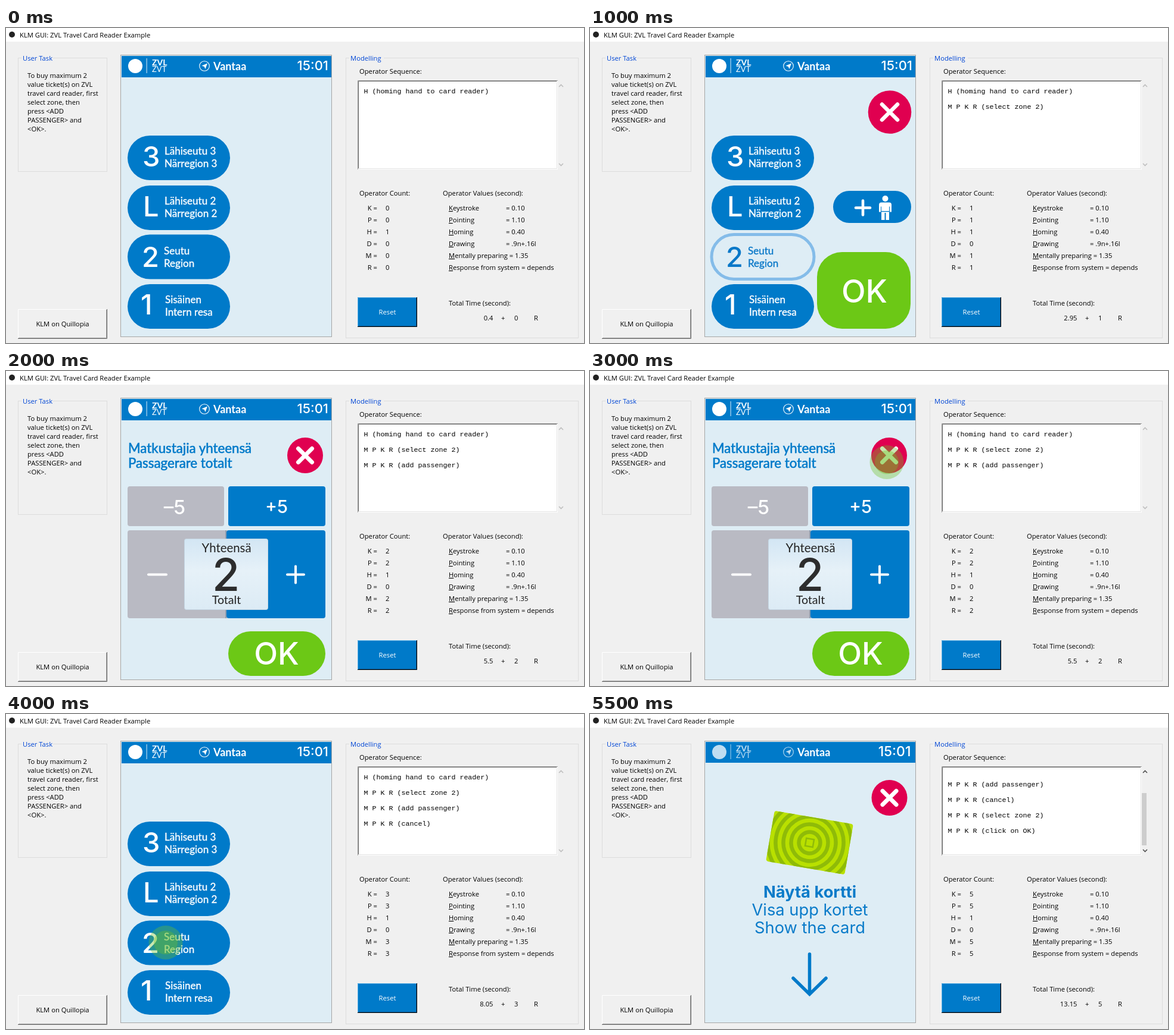
Recreate the animation shown at these times as an HTML page. Size 970x530 px, loop 6.5 s.

```html
<!DOCTYPE html>
<html lang="en">
<head>
<meta charset="utf-8">
<title>KLM GUI</title>
<style>
html, body { margin: 0; width: 100%; height: 100%; overflow: hidden; background: #f0f0f0; }
svg { display: block; }
text { white-space: pre; }
.ui { font: 11.22px "Open Sans", "Noto Sans", sans-serif; fill: #000; }
.log { font: 11.67px "Liberation Mono", monospace; fill: #000; }
.dev { font-family: Lato, sans-serif; }
.num { font-family: Inter, sans-serif; font-weight: 500; }
.card { font: 27.3px Inter, sans-serif; fill: #0a7bc9; }
.mid { text-anchor: middle; }
.end { text-anchor: end; }
.bold { font-weight: 700; }
.blue { fill: #007ac9; }
.white { fill: #fff; }
.legend { fill: #0046d5; }
.frame { fill: none; stroke: #dcdcdc; }
.line { fill: none; stroke: #fff; stroke-linecap: round; }
.zone text { fill: #fff; }
.zone .dev { stroke: #fff; stroke-width: .35; }
.zone.on rect { fill: #deedf5; stroke: #84bce9; stroke-width: 5; }
.zone.on text { fill: #0a78c8; }
.zone.on .dev { stroke: #0a78c8; }
</style>
</head>
<body>
<svg id="stage" width="970" height="530" viewBox="0 0 970 530"></svg>
<script>
const BLUE = '#007ac9', PINK = '#e00050', GREEN = '#6cc816', GREY = '#b9bac3';

const txt = (x, y, s, cls = 'ui', attrs = '') => `<text x="${x}" y="${y}" class="${cls}" ${attrs}>${s}</text>`;
const box = (x, y, w, h, fill, rx = 0, attrs = '') =>
  `<rect x="${x}" y="${y}" width="${w}" height="${h}" rx="${rx}" fill="${fill}" ${attrs}/>`;
const disc = (x, y, r, fill) => `<circle cx="${x}" cy="${y}" r="${r}" fill="${fill}"/>`;
const line = (d, w, attrs = '') => `<path d="${d}" class="line" stroke-width="${w}" ${attrs}/>`;
const dev = (x, y, s, size, cls, attrs = '') => txt(x, y, s, 'dev ' + cls, `font-size="${size}" ${attrs}`);
const num = (x, y, s, size, cls = '', attrs = '') => txt(x, y, s, 'num ' + cls, `font-size="${size}" ${attrs}`);
const group = (id, body) => `<g id="${id}">${body}</g>`;

// one-pixel corner lines: top-left and bottom-right, inset by i
const topLeft = (x, y, w, h, color, i = 0) =>
  `<path d="M${x + i + .5} ${y + h - i}V${y + i + .5}H${x + w - i}" fill="none" stroke="${color}"/>`;
const bottomRight = (x, y, w, h, color, i = 0) =>
  `<path d="M${x + i} ${y + h - i - .5}H${x + w - i - .5}V${y + i}" fill="none" stroke="${color}"/>`;
const raised = (x, y, w, h, fill, light, shade, edge) => box(x, y, w, h, fill) +
  topLeft(x, y, w, h, light) + bottomRight(x, y, w, h, shade, 1) + bottomRight(x, y, w, h, edge);
const sunken = (x, y, w, h) => box(x, y, w, h, '#fff') +
  topLeft(x, y, w, h, '#a0a0a0') + topLeft(x, y, w, h, '#696969', 1) + bottomRight(x, y, w, h, '#e3e3e3', 1);

const legend = (x, y, w, h, label, labelWidth) =>
  box(x + .5, y + .5, w, h, 'none', 0, 'class="frame"') +
  box(x + 6, y - 4, labelWidth, 10, '#f0f0f0') + txt(x + 8, y + 5, label, 'ui legend');

const cross = (x, y, r, arm, w) => disc(x, y, r, PINK) +
  line(`M${x - arm} ${y - arm}l${2 * arm} ${2 * arm}m0 ${-2 * arm}l${-2 * arm} ${2 * arm}`, w);

const header = (h, clock, clockX, clockSize, fade) => box(194, 47, 352, h, BLUE) +
  `<g opacity="${fade}">` + disc(217, 64, 12, '#fff') + box(235.5, 51, 1.4, 25, '#9fcbea') +
  dev(245, 63, 'ZVL', 14, 'white bold') + dev(245, 74, 'ZVT', 13, 'white') +
  `<circle cx="333" cy="64" r="8.3" fill="none" stroke="#fff" stroke-width="1.1"/>` +
  '<path d="M338 59.5l-3.5 9.5-1.8-4-4.2-1.6z" fill="#fff"/></g>' +
  dev(348, 71, 'Vantaa', 18, 'white bold') + num(clockX, 71, clock, clockSize, 'white end');

const zones = [
  ['3', 'Lähiseutu 3', 'Närregion 3', 181, 229, 266, 232.5, 213],
  ['L', 'Lähiseutu 2', 'Närregion 2', 265, 230, 266, 317, 297],
  ['2', 'Seutu', 'Region', 347.5, 228, 265, 402, 381],
  ['1', 'Sisäinen', 'Intern resa', 431, 226, 267, 482, 463]
];
const zone = ([mark, fi, sv, y, nx, tx, ny, ty], i) => `<g class="zone" id="zone${i}">` +
  box(204, y, 172, 75, BLUE, 37.5) + num(nx, ny, mark, 47) +
  dev(tx, ty, fi, 17, '') + dev(tx, ty + 20.5, sv, 17, '') + '</g>';

const person = disc(495.5, 287, 5, '#fff') +
  '<path d="M489 293.5h13q4 0 4 4v12h-3v-9h-1v22.5h-5.5v-12h-2v12H489v-22.5h-1v9h-3v-12q0-4 4-4z" fill="#fff"/>' +
  box(488, 308, 15, 1.3, BLUE);

const confirm = cross(503, 141.5, 36.3, 13, 6.5) +
  box(408, 274, 131, 54, BLUE, 27) + line('M446 302.5h24m-12-12v24', 4.6) + person +
  box(381, 377, 157, 129, GREEN, 42) + num(460.5, 461.5, 'OK', 53, 'white mid');

const head = 'stroke="#007ac9" stroke-width=".6"';
const passengers = dev(205, 138, 'Matkustajia yhteensä', 22.3, 'blue', head) +
  dev(205, 163, 'Passagerare totalt', 22.3, 'blue', head) + cross(502, 142, 30, 11.5, 7) +
  box(204, 194, 162, 67, GREY, 4) + box(373, 194, 163, 67, BLUE, 4) +
  num(283, 241, '–5', 33, 'white mid') + num(454, 239, '+5', 30, 'white mid') +
  box(204, 268, 170, 148, GREY, 4) + box(370, 268, 166, 148, BLUE, 4) + box(368, 268, 2, 148, '#8d9db0') +
  line('M239 342.5h30', 4) + line('M472 342.5h28m-14-14v28', 4) +
  box(299.5, 282.5, 140, 119, 'url(#glass)', 3, 'stroke="#c4d5e2"') +
  dev(370, 305, 'Yhteensä', 20.4, 'mid', 'fill="#222"') +
  num(369, 370, '2', 75, 'mid', 'fill="#2d2d2d"') +
  dev(370, 392, 'Totalt', 19.6, 'mid', 'fill="#222"') +
  box(373, 438, 163, 75, GREEN, 37.5) + num(454, 494, 'OK', 52, 'white mid');

const rings = [18, 31, 44, 57, 70].map(r =>
  `<circle r="${r}" fill="none" stroke="#8fbb08" stroke-width="6.5"/>`).join('');
const show = '<g transform="translate(368.5 216.5) rotate(9.8)">' + box(-67, -43, 134, 86, '#b9e000', 4) +
  `<g clip-path="url(#cardClip)">${rings}</g>` +
  box(-6.5, -6.5, 13, 13, 'none', 0, 'stroke="#8fbb08" stroke-width="2.5"') + '</g>' +
  txt(369, 309, 'Näytä kortti', 'card mid bold') + txt(369, 339, 'Visa upp kortet', 'card mid') +
  txt(369, 368.5, 'Show the card', 'card mid') +
  line('M368.5 404v67M341 444.5l27.5 27 27.5-27', 5.5, `style="stroke:${BLUE}"`) + cross(502.5, 141, 30, 11.5, 7);

const task = ['To buy maximum 2', 'value ticket(s) on ZVL', 'travel card reader, first', 'select zone, then',
  'press &lt;ADD', 'PASSENGER&gt; and', '&lt;OK&gt;.'];
const values = [['Keystroke', '= 0.10'], ['Pointing', '= 1.10'], ['Homing', '= 0.40'], ['Drawing', '= .9n+.16l'],
  ['Mentally preparing = 1.35', ''], ['Response from system = depends', '']];
const ops = [...'KPHDMR'];
const opRow = (op, i) => {
  const y = 307 + 20 * i, [name, value] = values[i];
  return txt(623, y, op + ' =', 'ui end') + txt(637, y, '0', 'ui', `id="n${op}"`) +
    txt(743, y, `<tspan text-decoration="underline">${name[0]}</tspan>${name.slice(1)}`) + txt(839, y, value);
};

const entries = ['H (homing hand to card reader)', 'M P K R (select zone 2)', 'M P K R (add passenger)',
  'M P K R (cancel)', 'M P K R (select zone 2)', 'M P K R (click on OK)'];

const modelling = legend(570, 50, 390, 471, 'Modelling', 58) +
  txt(593, 77, 'Operator Sequence:') + sunken(590, 88, 336, 150) +
  '<g clip-path="url(#logClip)">' +
  group('log', entries.map((s, i) => txt(600.5, 110 + 26 * i, s, 'log', `id="entry${i}"`)).join('')) + '</g>' +
  '<path id="arrows" d="M928 99l3.5-3.5 3.5 3.5M928 228l3.5 3.5 3.5-3.5" fill="none" stroke-width="1.6"/>' +
  box(926, 117, 8, 104, '#cdcdcd', 0, 'id="thumb"') +
  txt(593, 282, 'Operator Count:') + txt(733, 282, 'Operator Values (second):') + ops.map(opRow).join('') +
  raised(590, 453, 100, 50, BLUE, '#5fb2e6', '#00528a', '#000') + txt(640, 482, 'Reset', 'ui mid white') +
  txt(743, 467, 'Total Time (second):') + txt(817.5, 492, '', 'ui end', 'id="total"') +
  txt(831, 492, '+') + txt(853, 492, '0', 'ui', 'id="waits"') + txt(886, 492, 'R');

const $ = id => document.getElementById(id);
$('stage').innerHTML = `<defs>
  <linearGradient id="glass" x2="0" y2="1"><stop stop-color="#d3e6f4"/><stop offset=".45" stop-color="#e6f1f8"/><stop offset="1" stop-color="#dcebf5"/></linearGradient>
  <clipPath id="cardClip"><rect x="-67" y="-43" width="134" height="86" rx="4"/></clipPath>
  <clipPath id="logClip"><rect x="592" y="99" width="332" height="128"/></clipPath></defs>` +
  box(0, 0, 970, 530, '#f0f0f0') + box(0, 0, 970, 23, '#fff') + disc(10, 11, 5, '#222') +
  txt(23, 16, 'KLM GUI: ZVL Travel Card Reader Example') +
  legend(20, 50, 149, 191, 'User Task', 53) + task.map((s, i) => txt(36, 84 + 15 * i, s)).join('') +
  raised(20, 473, 150, 50, '#f0f0f0', '#fff', '#a0a0a0', '#696969') + txt(95, 502, 'KLM on Quillopia', 'ui mid') +
  box(192.5, 45.5, 354, 474, '#deedf5', 0, 'stroke="#a6a6a6"') +
  group('top', header(36, '15:01', 541, 22, 1)) + group('topShow', header(35, '15:01', 538.5, 23, .75)) +
  group('zones', zones.map(zone).join('')) + group('confirm', confirm) +
  group('passengers', passengers) + group('show', show) +
  '<g id="tap" fill="#6cc024" fill-opacity=".36"><circle r="28.5"/><circle r="20"/></g>' + modelling;

// start time, screen, steps done, tap [x, y, scale]
const steps = [
  [0, 'zones', 0],
  [500, 'zones', 0, [269, 385.5, .91]],
  [1000, 'confirm', 1],
  [1500, 'confirm', 1, [478.5, 302.5, .9]],
  [2000, 'passengers', 2],
  [3000, 'passengers', 2, [498, 153.5, 1]],
  [3500, 'zones', 3],
  [4000, 'zones', 3, [268, 384.5, 1]],
  [4500, 'confirm', 4],
  [5000, 'confirm', 4, [462, 442, 1]],
  [5500, 'show', 5]
];
const LOOP = 6500;
const toggle = (id, on) => { $(id).style.display = on ? '' : 'none'; };

function render([, screen, n, tap]) {
  toggle('zones', screen === 'zones' || screen === 'confirm');
  for (const id of ['confirm', 'passengers', 'show']) toggle(id, screen === id);
  toggle('top', screen !== 'show');
  toggle('topShow', screen === 'show');
  $('zone2').classList.toggle('on', screen === 'confirm');
  toggle('tap', tap);
  if (tap) $('tap').setAttribute('transform', `translate(${tap[0]} ${tap[1]}) scale(${tap[2]})`);

  for (const op of 'KPMR') $('n' + op).textContent = n;
  $('nH').textContent = 1;
  $('waits').textContent = n;
  $('total').textContent = +(0.4 + 2.55 * n).toFixed(2);

  entries.forEach((_, i) => toggle('entry' + i, i <= n));
  const scrolls = n > 3;
  $('log').setAttribute('transform', `translate(0 ${scrolls ? 90 - 26 * n : 0})`);
  $('arrows').setAttribute('stroke', scrolls ? '#505050' : '#bfbfbf');
  toggle('thumb', scrolls);
  const top = n === 5 ? 133 : 117;
  $('thumb').setAttribute('y', top);
  $('thumb').setAttribute('height', 221 - top);
}

let shown;
function tick() {
  const t = performance.now() % LOOP;
  const step = steps.findLast(s => s[0] <= t);
  if (step !== shown) render(shown = step);
  requestAnimationFrame(tick);
}
tick();
</script>
</body>
</html>
```
